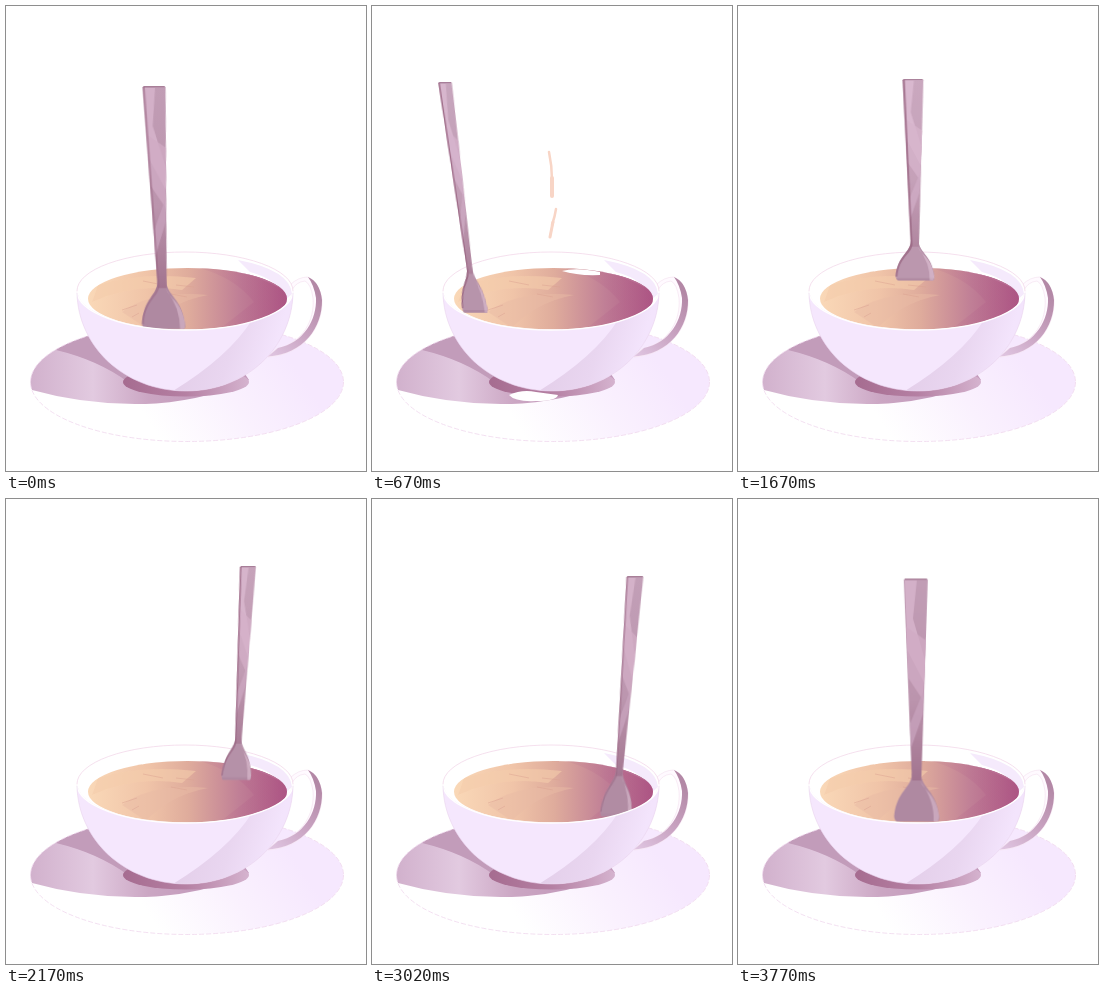
Recreate the animation shown at these times as an HTML page without scripts. Size 360 px wide and 465 px high, loop 3.82 s.

```html
<!DOCTYPE html>
<html lang="en">
<head>
<meta charset="utf-8">
<title>Stirred cup of tea</title>
<style>
html, body { margin: 0; width: 100%; height: 100%; overflow: hidden; background: #fff; }
svg { display: block; width: 360px; height: 465px; }

#spoon, .sheen, .edge, .steam, .glint { animation: 3.82s infinite; }
#spoon { animation-name: stir; }
.sheen { animation-name: sheen; animation-timing-function: steps(6); }
.edge { animation-name: edge; animation-timing-function: steps(6); }
.steam { fill: none; stroke: #f8d5c6; stroke-linecap: round; opacity: 0; animation-timing-function: steps(6); }
.steam.a { animation-name: steam-a; }
.steam.b { animation-name: steam-b; }
.glint { fill: #fff; visibility: hidden; animation-timing-function: step-end; }
.glint.a { animation-name: glint-a; }
.glint.b { animation-name: glint-b; }

/* The spoon circles the cup, moving once every 50 ms. */
@keyframes stir {
  0%     { transform: translate(148px, 80px) skewX(2.3deg) scale(.96, 1); animation-timing-function: step-end; }
  .52%   { transform: translate(148px, 80px) skewX(2.3deg) scale(.96, 1); animation-timing-function: steps(4); }
  5.76%  { transform: translate(118px, 80px) skewX(4deg) scale(.9, 1); animation-timing-function: steps(3); }
  9.69%  { transform: translate(97px, 79px) skewX(5.6deg) scale(.78, .99); animation-timing-function: steps(3); }
  13.61% { transform: translate(81px, 78px) skewX(6.8deg) scale(.65, .98); animation-timing-function: steps(3); }
  17.54% { transform: translate(73px, 76px) skewX(7.5deg) scale(.56, .95); animation-timing-function: steps(4); }
  22.77% { transform: translate(82px, 72px) skewX(6deg) scale(.56, .92); animation-timing-function: steps(5); }
  29.32% { transform: translate(113.5px, 69px) skewX(3.5deg) scale(.7, .91); animation-timing-function: steps(5); }
  35.86% { transform: translate(143px, 69px) skewX(2deg) scale(.79, .87); animation-timing-function: steps(6); }
  43.72% { transform: translate(175px, 73px) skewX(.6deg) scale(.86, .83); animation-timing-function: steps(5); }
  50.26% { transform: translate(209px, 70px) skewX(-1.3deg) scale(.8, .85); animation-timing-function: steps(5); }
  56.81% { transform: translate(242px, 67px) skewX(-3.2deg) scale(.66, .88); animation-timing-function: steps(4); }
  62.04% { transform: translate(263px, 67px) skewX(-4.5deg) scale(.5, .91); animation-timing-function: steps(5); }
  68.59% { transform: translate(276px, 74px) skewX(-5.3deg) scale(.42, .95); animation-timing-function: steps(4); }
  73.82% { transform: translate(274px, 75px) skewX(-5.3deg) scale(.52, .97); animation-timing-function: steps(4); }
  79.06% { transform: translate(263px, 77px) skewX(-4.6deg) scale(.7, .99); animation-timing-function: steps(4); }
  84.29% { transform: translate(245px, 78px) skewX(-3.6deg) scale(.88, 1); animation-timing-function: steps(4); }
  89.53% { transform: translate(222px, 79px) skewX(-2.4deg) scale(1, 1); animation-timing-function: steps(7); }
  98.69%, 100% { transform: translate(177.8px, 79.5px) skewX(.2deg) scale(1, 1); animation-timing-function: step-end; }
}
@keyframes sheen {
  0%, 100% { opacity: 0; }
  17%  { opacity: .12; }
  29%  { opacity: .4; }
  44%  { opacity: .12; }
  68%  { opacity: .05; }
  85%  { opacity: 0; }
}
@keyframes edge {
  0%   { opacity: .5; }
  17%  { opacity: .9; }
  29%  { opacity: 1; }
  44%, 68% { opacity: .7; }
  90%  { opacity: .3; }
  98%, 100% { opacity: 0; }
}
@keyframes steam-a {
  0%, 10%, 25%, 100% { opacity: 0; }
  10%  { transform: translateY(14px); }
  15%, 20% { opacity: 1; }
  17.5% { transform: none; }
  25%  { transform: translateY(-14px); }
}
@keyframes steam-b {
  0%, 60%, 76%, 100% { opacity: 0; }
  60%  { transform: translateY(14px); }
  65%, 71% { opacity: 1; }
  68.5% { transform: none; }
  76%  { transform: translateY(-14px); }
}
@keyframes glint-a {
  16.23% { visibility: visible; }
  18.85% { visibility: hidden; }
}
@keyframes glint-b {
  67.28% { visibility: visible; }
  69.9%  { visibility: hidden; }
}
</style>
</head>
<body>
<svg viewBox="0 0 360 465">
  <defs>
    <linearGradient id="plate" x1="0" y1=".6" x2="1" y2=".35">
      <stop offset=".3" stop-color="#fff"/><stop offset=".6" stop-color="#faf1fe"/><stop offset=".85" stop-color="#f6e8fe"/>
    </linearGradient>
    <linearGradient id="shadow">
      <stop offset="0" stop-color="#d0afcb"/><stop offset=".3" stop-color="#e2cae0"/>
      <stop offset=".55" stop-color="#cba6c3"/><stop offset=".8" stop-color="#c39abb"/>
    </linearGradient>
    <linearGradient id="foot">
      <stop offset="0" stop-color="#a66c90"/><stop offset=".5" stop-color="#b580a3"/><stop offset="1" stop-color="#d5b3cf"/>
    </linearGradient>
    <linearGradient id="tea">
      <stop offset="0" stop-color="#fad9b8"/><stop offset=".3" stop-color="#f0c4a8"/>
      <stop offset=".5" stop-color="#dfac9c"/><stop offset=".75" stop-color="#c07f96"/><stop offset="1" stop-color="#ad5685"/>
    </linearGradient>
    <linearGradient id="teaShade">
      <stop offset="0" stop-color="#cf9897"/><stop offset=".5" stop-color="#b86c8f"/><stop offset="1" stop-color="#a94c7f"/>
    </linearGradient>
    <linearGradient id="body" x1=".2" y1=".4" x2="1" y2=".6">
      <stop offset="0" stop-color="#e4cfea"/><stop offset=".4" stop-color="#e9d6f0"/><stop offset=".8" stop-color="#f3e4fc"/>
    </linearGradient>
    <linearGradient id="ear" x1="0" y1="1" x2=".6" y2="0">
      <stop offset="0" stop-color="#e0c6e2"/><stop offset=".55" stop-color="#c7a1bf"/><stop offset="1" stop-color="#b388a6"/>
    </linearGradient>
    <linearGradient id="steel" x2="0" y2="1">
      <stop offset="0" stop-color="#c19db5"/><stop offset=".6" stop-color="#bb94ad"/><stop offset="1" stop-color="#a2748f"/>
    </linearGradient>
    <clipPath id="plateEdge"><ellipse cx="181" cy="376" rx="156.5" ry="59.5"/></clipPath>
    <clipPath id="teaEdge"><ellipse cx="181.5" cy="292.700" rx="99.5" ry="30.700"/></clipPath>
    <path id="bowlShape" d="M71 285C71 340 118 385 180 385S287 340 287 285A108 39 0 0 1 71 285Z"/>
    <clipPath id="bodyEdge"><use href="#bowlShape"/></clipPath>
  </defs>

  <!-- saucer -->
  <ellipse cx="181" cy="376" rx="156.500" ry="59.500" fill="url(#plate)"/>
  <g clip-path="url(#plateEdge)">
    <path d="M20 310H200L243 374Q205 393 150 397.500Q85 401 22 383Z" fill="url(#shadow)"/>
    <path d="M50 344L70 310H150V376H122Q92 354 50 344Z" fill="#c29cba"/>
  </g>
  <ellipse cx="181" cy="376" rx="156.500" ry="59.500" fill="none" stroke="#f0d9ee" stroke-width=".8" stroke-dasharray="5 2"/>
  <ellipse cx="180" cy="376" rx="63" ry="14.500" fill="url(#foot)"/>
  <path class="glint a" d="M137 389Q150 383 164 386L186 389Q184 395 164 395Q143 396 137 389Z"/>

  <!-- cup handle -->
  <path d="M284 279Q292 271 302 271Q314 278 316 294C317 320 299 348 262 351L270 343C297 337 309 314 307 292Q305 278 299 275Q290 276 286 284Z" fill="#fffaff" stroke="#f3dfee" stroke-width=".6"/>
  <path d="M302 271Q314 276 316 294C316.500 321 298 348 262 350.500L272 342C298 337 311 313 310 292Q308 279 302 271Z" fill="url(#ear)"/>

  <!-- inside of the cup -->
  <ellipse cx="179" cy="285" rx="108" ry="39" fill="#fff" stroke="#f3d8ea" stroke-width=".8"/>
  <path d="M232 254Q284 264 286 288L279 294Q274 274 244 266Z" fill="#f5eafc"/>
  <g clip-path="url(#teaEdge)">
    <path d="M80 260H284V326H80Z" fill="url(#tea)"/>
    <path d="M186 260Q228 270 248 296L210 326H284V260Z" fill="url(#teaShade)" opacity=".4"/>
    <path d="M216 262Q250 268 284 287V260Z" fill="#ba7196"/>
    <path d="M92 279Q134 266 190 272L176 284Q128 277 86 296Z" fill="#f6cdac" opacity=".6"/>
    <path d="M116 306Q145 284 202 289Q164 296 140 322Z" fill="#e9bca5" opacity=".5"/>
    <path d="M116 304l15-5M126 311l7-4M137 275l20 4M165 288l16 3M170 279l18 2" fill="none" stroke="#d9a08f" stroke-width=".8" opacity=".6"/>
  </g>
  <path class="glint a" d="M190 265Q204 261 228 266V269Q206 270 190 265Z"/>
  <path class="glint b" d="M139 265Q163 261 187 264V266Q162 266 139 265Z"/>

  <g class="steam a">
    <path d="M177 146Q180 160 180 174" stroke-width="2.500"/>
    <path d="M180 172V190" stroke-width="4"/>
    <path d="M184 203Q183 210 180 219" stroke-width="2.500"/>
    <path d="M181 216L178 231" stroke-width="3"/>
  </g>
  <g class="steam b">
    <path d="M174.500 121V150" stroke-width="1.300"/>
    <path d="M174.500 150Q180 160 180 174T183 191" stroke-width="2.500"/>
    <path d="M179 211Q183 218 182 224T182 234" stroke-width="2.500"/>
  </g>

  <!-- spoon, drawn from the middle of its top edge -->
  <g id="spoon">
    <path d="M-4.500 195C-5 210-20 212-22.500 238Q-22 242-20 243H21Q23 242 22.500 238C20 212 5 210 4.500 195Z" fill="#af89a1"/>
    <path d="M4 203C8 213 20 216 22.500 238Q22 242 21 243H17Q18 222 4 203Z" fill="#c9a7bc"/>
    <path d="M-12 1.500Q-11.500 0-10 0H10Q12 0 12 1.500L4.800 202H-4.500Z" fill="url(#steel)"/>
    <path d="M-11 2H1L-3 40L9 82L8 104L-8.500 72Z" fill="#d3b0c8"/>
    <path d="M-10 48L10 62L7 122L-7.500 100Z" fill="#d0abc5" opacity=".75"/>
    <path d="M7.500 112L-6.500 146L-5.500 170L6.500 136Z" fill="#c7a1bb" opacity=".8"/>
    <path d="M-11 .7H11" stroke="#a57c96" stroke-width="1.200"/>
    <path class="sheen" d="M-10 1H12L4.500 198C6 211 20 213 22.500 240H-22C-20 212-5 211-4 198Z" fill="#f6dff0"/>
    <path class="edge" d="M-12 1H-9.500L-2.500 200C-5 212-18 214-20.500 238H-22.500C-20 212-5 210-4.500 195Z" fill="#986480"/>
  </g>

  <!-- front of the cup -->
  <use href="#bowlShape" fill="#f5e7fd"/>
  <path d="M246 314Q222 352 162 388H290V280Z" fill="url(#body)" clip-path="url(#bodyEdge)"/>
  <path d="M71 285A108 39 0 0 0 287 285" fill="none" stroke="#fff" stroke-width="1.300"/>
  <path d="M71 287C72 340 118 385 180 385S286 340 287 287" fill="none" stroke="#ead4ec" stroke-width=".6"/>
</svg>
</body>
</html>
```
